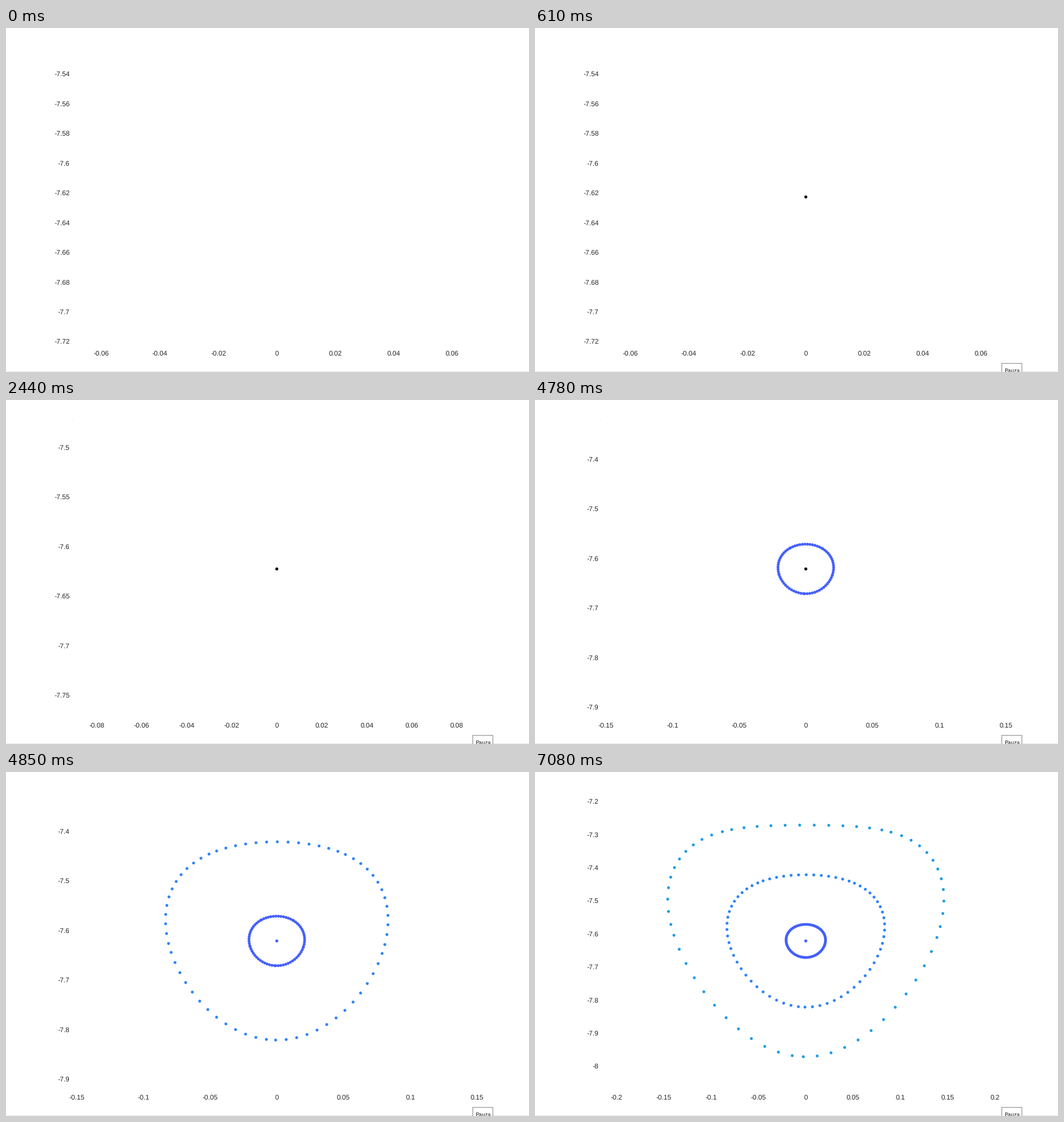
Animation, 923 px wide and 607 px high, one loop 8000 ms. Source, as a matplotlib script:

```python
import numpy as np
import matplotlib.pyplot as plt
from matplotlib.animation import FuncAnimation
from matplotlib.patches import Rectangle

plt.rcParams["text.hinting"] = "none"

W, H, DPI = 923, 607, 100
PT = 72 / DPI
LOOP, STEP = 8000, 20
CX, CY = 477.9, 298.1
BLUE = "#435ffd"

# x scale, y scale (px per unit), pixel row of -7.6, x tick step and reach, y tick top, step and count
VIEWS = [
    (5158, 2623, 238.4, 0.02, 3, -7.54, 0.02, 10),
    (3972, 1751, 258.4, 0.02, 4, -7.50, 0.05, 6),
    (2355, 874.5, 279.2, 0.05, 3, -7.40, 0.10, 6),
    (1670, 584, 285.3, 0.05, 4, -7.20, 0.10, 9),
]

# amplitude, crossings, crossings per turn, phase offset, colour
ORBITS = [
    (0.05, 71, 68.25, 0.0063, BLUE),
    (0.20, 66, 65.4, 0.0017, "#2d85fa"),
    (0.35, 61, 60.0, 0.0030, "#1e9de6"),
]

# start ms, view, visible orbits, colour of the fixed point
STATES = [
    (0, 0, 0, None),
    (280, 0, 0, "black"),
    (2440, 1, 0, "black"),
    (2510, 1, 1, "black"),
    (4780, 2, 1, "black"),
    (4850, 2, 2, BLUE),
    (6940, 3, 2, "black"),
    (7080, 3, 3, BLUE),
]

fig = plt.figure(figsize=(W / DPI, H / DPI), dpi=DPI, facecolor="white")
ax = fig.add_axes([0, 0, 1, 1])
ax.set_xlim(0, W)
ax.set_ylim(H, 0)
ax.set_autoscale_on(False)
ax.axis("off")


def orbit(amplitude, count, per_turn, offset):
    """Successive crossings of a closed curve with a rotation number near 1/5."""
    rho = 0.2 - 0.2 / per_turn
    q = 2 * np.pi * (0.5 + offset + rho * np.arange(count))
    r = amplitude / 0.35
    x = 0.1459 * r * np.sin(q)
    x += r**3 * (0.0009 * np.sin(4 * q) - 0.0005 * (np.sin(3 * q) + np.sin(q)))
    y = amplitude * np.cos(q) + 0.067 * r**2 * (1 - np.cos(2 * q))
    y += r**3 * (0.0025 * (np.cos(3 * q) - np.cos(q))
                 - 0.0007 * (np.cos(5 * q) - np.cos(q))
                 + 0.0023 * (1 - np.cos(4 * q)))
    return x, y


def label(x, y, value, align):
    return ax.text(x, y + 4.3, f"{value:g}", ha=align, va="baseline",
                   family="Liberation Sans", size=12 * PT, color="#262626")


def tick_labels(sx, sy, row, dx, reach, top, dy, count):
    xs = [round(i * dx, 2) for i in range(-reach, reach + 1)]
    ys = [round(top - i * dy, 2) for i in range(count)]
    return ([label(CX + v * sx, 573.7, v, "center") for v in xs]
            + [label(112.5, row - (v + 7.6) * sy, v, "right") for v in ys])


def dots(color, size):
    # Without an edge colour each dot keeps its sub-pixel position.
    return ax.scatter([CX], [CY], s=(size * PT) ** 2, c=color, edgecolors="none")


ticks = [tick_labels(*view) for view in VIEWS]
curves = [orbit(*o[:4]) for o in ORBITS]
rings = [dots(o[4], 5.1) for o in ORBITS]
center = dots("black", 5.3)

ax.add_patch(Rectangle((0, 606), W, 1, fc="#e6e6e6", lw=0))
corner = ax.add_patch(Rectangle((117, 35), 1, 1, fc="#d8d8d8", lw=0))
button = [
    ax.add_patch(Rectangle((823.75, 591.75), 35.5, 30, fc="white", ec="#a6a6a6",
                           lw=1.5 * PT, snap=False)),
    ax.text(841.5, 607.7, "Pauza", ha="center", va="baseline",
            family="Noto Sans CJK JP", size=9.6 * PT, color="#444444"),
]


def update(i):
    t = i * STEP + STEP / 2
    _, view, shown, color = [s for s in STATES if s[0] <= t][-1]
    sx, sy = VIEWS[view][:2]
    for k, group in enumerate(ticks):
        for text in group:
            text.set_visible(k == view)
    for k, (ring, (x, y)) in enumerate(zip(rings, curves)):
        ring.set_offsets(np.column_stack([CX + x * sx, CY - y * sy]))
        ring.set_visible(k < shown)
    center.set_visible(color is not None)
    center.set_facecolor(color or "black")
    corner.set_visible(view > 0)
    for part in button:
        part.set_visible(t >= 530)
        part.set_alpha(0.5 if t < 610 else 1)
    return []


anim = FuncAnimation(fig, update, frames=LOOP // STEP, interval=STEP,
                     repeat=True, repeat_delay=0)
plt.show()
```
